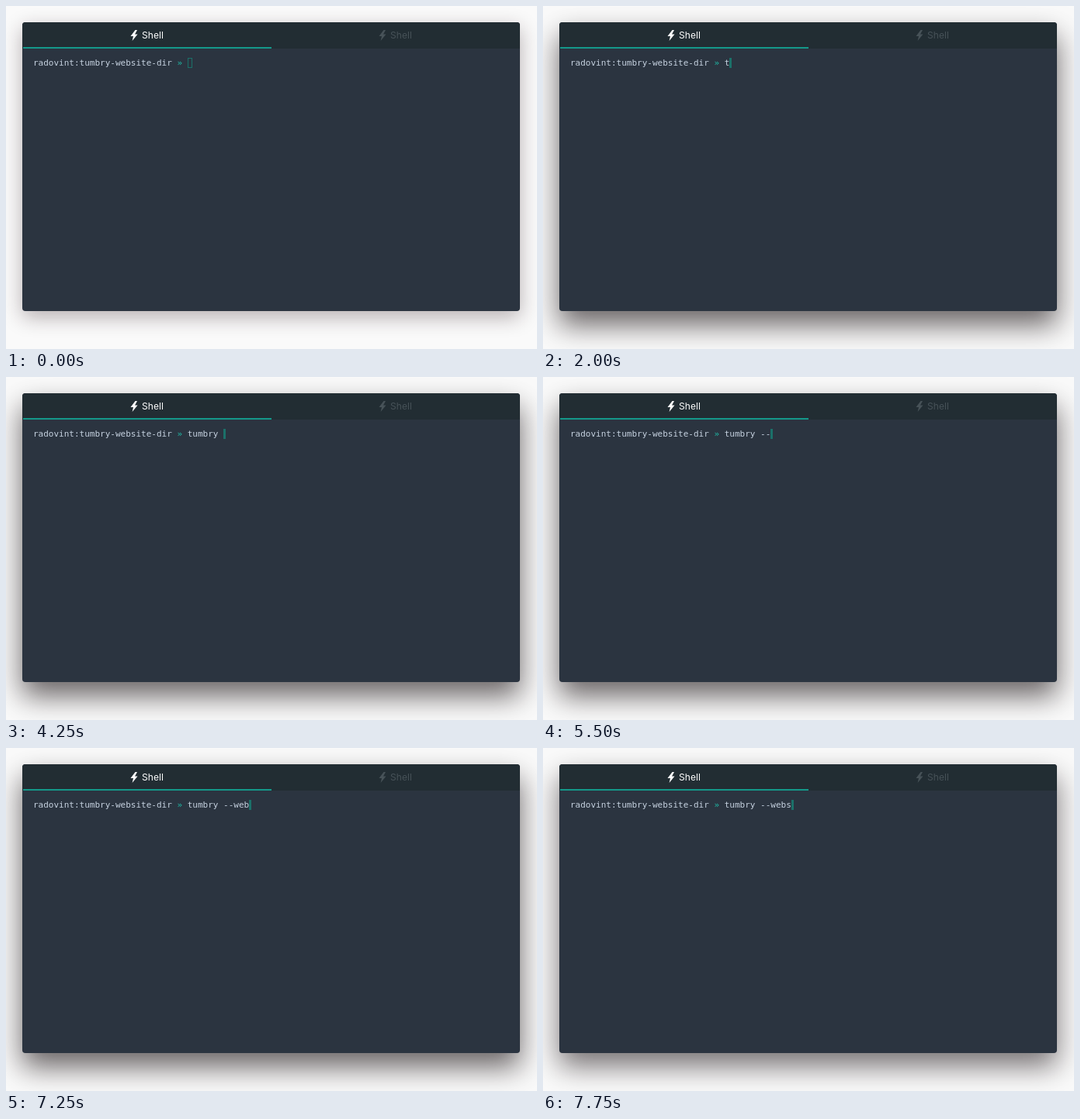
Recreate the animation shown at these times as an HTML page. Size 684x443 px, loop 8 s.

```html
<!DOCTYPE html>
<html lang="en">
<head>
<meta charset="utf-8">
<title>Shell</title>
<style>
  html, body { margin: 0; width: 100%; height: 100%; overflow: hidden; background: #fafafa; }
  .stage { position: relative; width: 684px; height: 443px; overflow: hidden; }
  .window {
    position: absolute; left: 21px; top: 21px; width: 641px; height: 373px;
    border-radius: 4px; background: #2b3440;
    animation: focus 8s step-end infinite;
  }
  .tabs {
    position: absolute; left: 0; top: 0; width: 100%; height: 34px;
    border-radius: 4px 4px 0 0; background: #222d33;
  }
  .line { position: absolute; left: 1px; top: 32px; width: 320px; height: 2px; background: #14988a; }
  .tab {
    position: absolute; top: 0; height: 34px; color: #475258;
    font: 12px/34px Inter, "Liberation Sans", sans-serif; letter-spacing: .1px;
  }
  .tab.on { color: #fff; }
  .tab svg { position: absolute; left: 0; top: 10px; fill: currentColor; }
  .tab span { position: absolute; left: 15px; }
  .prompt {
    position: absolute; left: 14px; top: 46px; height: 13px; display: flex;
    font: 11px/13px "DejaVu Sans Mono", monospace; white-space: pre; color: #c6d2e0;
  }
  .prompt b { font-weight: normal; color: #1fb8a5; }
  .typed { width: 0; overflow: hidden; animation: type 8s step-end infinite; }
  .cursor {
    box-sizing: border-box; width: 3px; height: 13px; background: #1b7069;
    animation: cursor 8s step-end infinite;
  }

  @keyframes focus {
    0% { box-shadow: 0 8px 26px rgba(40, 20, 24, .32); }
    15.625% { box-shadow: 0 18px 36px rgba(16, 8, 10, .62); }
    93.75% { box-shadow: 0 17px 36px rgba(16, 8, 10, .56); }
  }
  @keyframes cursor {
    0% { width: 6px; background: none; border: 1px solid #1b7069; }
    15.625% { width: 3px; background: #1b7069; border: 0 solid #1b7069; }
  }
  @keyframes type {
    0% { width: 0; }
    25% { width: 1ch; }
    31.25% { width: 2ch; }
    34.375% { width: 3ch; }
    50% { width: 4ch; }
    53.125% { width: 7ch; }
    65.625% { width: 8ch; }
    68.75% { width: 9ch; }
    84.375% { width: 10ch; }
    87.5% { width: 11ch; }
    90.625% { width: 12ch; }
    96.875% { width: 13ch; }
  }
</style>
</head>
<body>
<svg width="0" height="0" style="position:absolute">
  <symbol id="bolt" viewBox="0 0 10 14"><path d="M6.5 0 0.5 8H4L2.6 14 9.5 5.6H6L9 0Z"/></symbol>
</svg>
<div class="stage">
  <div class="window">
    <div class="tabs">
      <div class="tab on" style="left:139px"><svg width="10" height="14"><use href="#bolt"/></svg><span>Shell</span></div>
      <div class="tab" style="left:459px"><svg width="10" height="14"><use href="#bolt"/></svg><span>Shell</span></div>
      <div class="line"></div>
    </div>
    <div class="prompt"><span>radovint:tumbry-website-dir <b>»</b> </span><span class="typed">tumbry --webs</span><span class="cursor"></span></div>
  </div>
</div>
</body>
</html>
```
